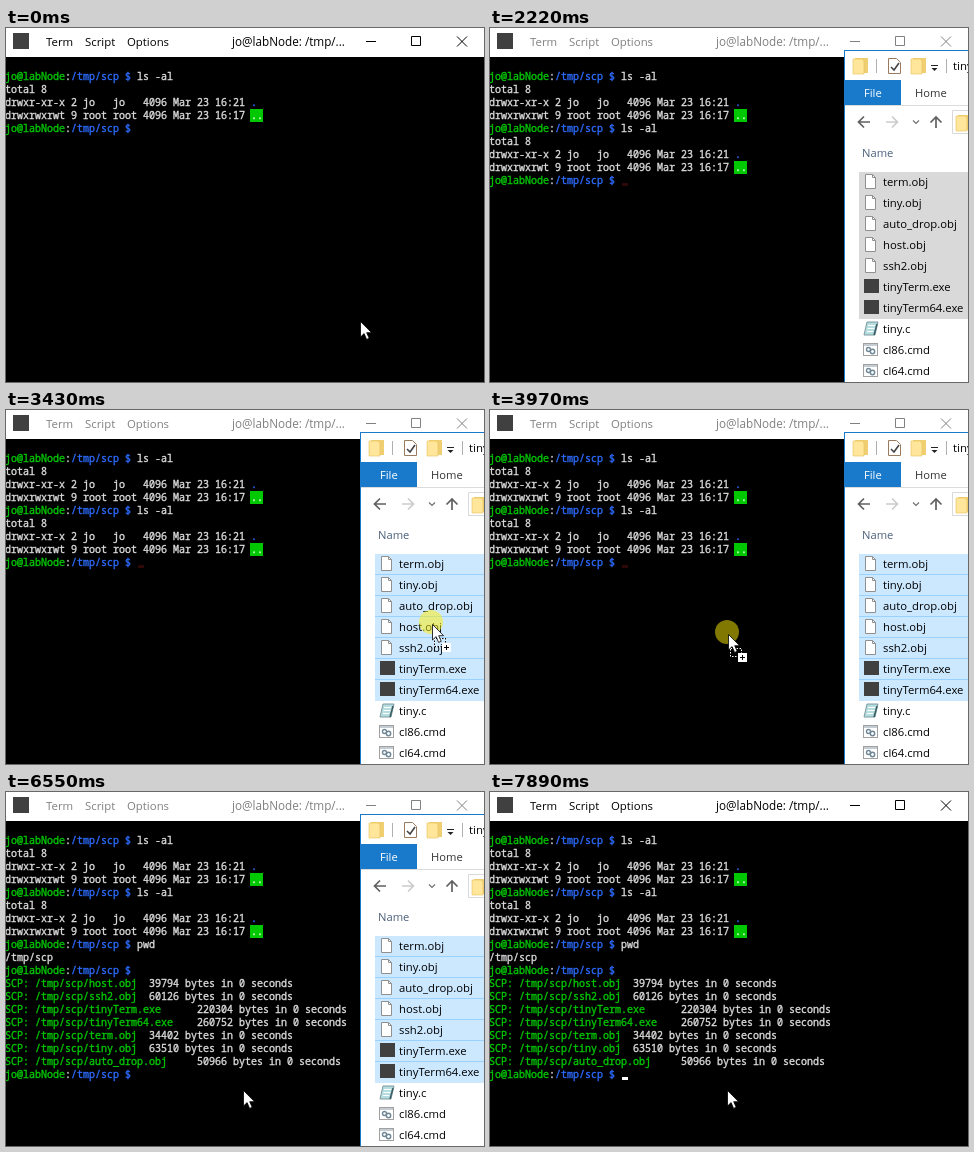
An HTML page for the animation above (8 s loop, 478x354 px).

```html
<!DOCTYPE html>
<html lang="en">
<head>
<meta charset="utf-8">
<title>Terminal file drop</title>
<style>
  html, body { margin: 0; width: 100%; height: 100%; overflow: hidden; background: #000; }
  svg { display: block; }
  text { white-space: pre; }
  .mono { font: 10px "Noto Sans Mono", "DejaVu Sans Mono", monospace; stroke-width: 0.35px; }
  .ui { font: 11.4px "Open Sans", "Noto Sans", sans-serif; }
</style>
</head>
<body>
<svg id="stage" width="478" height="354" viewBox="0 0 478 354"></svg>
<script>
const LOOP = 8000;
const GREEN = "#00c800", BLUE = "#2d6cff", GREY = "#dcdcdc";
const stage = document.getElementById("stage");
const timed = [];

function add(parent, tag, attrs, content) {
  const el = document.createElementNS("http://www.w3.org/2000/svg", tag);
  for (const key in attrs) el.setAttribute(key, attrs[key]);
  if (content !== undefined) el.textContent = content;
  parent.appendChild(el);
  return el;
}
const group = (parent, attrs = {}) => add(parent, "g", attrs);
const rect = (parent, x, y, width, height, fill, more = {}) =>
  add(parent, "rect", { x, y, width, height, fill, ...more });
const line = (parent, d, stroke, width = 1, fill = "none") =>
  add(parent, "path", { d, stroke, fill, "stroke-width": width });
const label = (parent, x, y, fill, content, size = 11.4) =>
  add(parent, "text", { x, y, fill, class: "ui", style: `font-size:${size}px` }, content);

// Visible from one time up to another
function show(el, from, to = LOOP) {
  timed.push({ el, from, to });
  return el;
}

// Terminal
const term = group(stage);
rect(term, 0, 0, 478, 354, "#000");
const rowY = row => 48 + 13 * row;
const put = (parent, row, col, fill, content) =>
  add(parent, "text", { x: col * 6 - 1, y: rowY(row) + 4, fill, stroke: fill, class: "mono" }, content);

function prompt(row, from, command = "") {
  const g = show(group(term), from);
  put(g, row, 0, GREEN, "jo@labNode");
  put(g, row, 10, GREY, ":");
  put(g, row, 11, BLUE, "/tmp/scp $");
  put(g, row, 22, GREY, command);
}
function listing(row, from) {
  const g = show(group(term), from);
  put(g, row, 0, GREY, "total 8");
  put(g, row + 1, 0, GREY, "drwxr-xr-x 2 jo   jo   4096 Mar 23 16:21");
  put(g, row + 1, 41, BLUE, ".");
  put(g, row + 2, 0, GREY, "drwxrwxrwt 9 root root 4096 Mar 23 16:17");
  rect(g, 244, rowY(row + 2) - 6, 13, 13, GREEN);
  put(g, row + 2, 41, "#e8ffe8", "..");
}
function caret(row, col, from, to, fill = "#fff") {
  show(rect(term, col * 6, rowY(row) + 3, 6, 3, fill), from, to);
}

prompt(0, 0, "ls -al");
listing(1, 0);
prompt(4, 0);
["l", "ls", "ls -", "ls -a", "ls -al"].forEach((typed, i, all) => {
  const from = 120 + 110 * i, last = i === all.length - 1;
  show(put(term, 4, 22, GREY, typed), from, last ? LOOP : from + 110);
  caret(4, 22 + typed.length, from, last ? 780 : from + 110);
});
caret(5, 0, 780, 900);
listing(5, 900);
prompt(8, 900);
caret(8, 22, 900, 1450);
caret(8, 22, 1890, 2220);
caret(8, 22, 2220, 4540, "#2c0808");

show(put(term, 8, 22, GREY, "pwd"), 4540);
show(put(term, 9, 0, GREY, "/tmp/scp"), 4540);
prompt(10, 4540);
[
  [4640, "host.obj", 24, 39794],
  [4860, "ssh2.obj", 24, 60126],
  [4980, "tinyTerm.exe", 32, 220304],
  [5200, "tinyTerm64.exe", 32, 260752],
  [5420, "term.obj", 24, 34402],
  [5540, "tiny.obj", 24, 63510],
  [5760, "auto_drop.obj", 32, 50966]
].forEach(([from, file, col, size], i) => {
  const g = show(group(term), from);
  put(g, 11 + i, 0, GREEN, "SCP: /tmp/scp/" + file);
  put(g, 11 + i, col, GREY, size + " bytes in 0 seconds");
});
prompt(18, 5760);
caret(18, 22, 6890, 7420);
caret(18, 22, 7890, LOOP);

// Title bar
rect(stage, 0, 0, 478, 29, "#fff");
rect(stage, 7, 5, 16, 16, "#404040");
function titleBar(ink, from, to) {
  const g = show(group(stage), from, to);
  label(g, 40, 18, ink, "Term");
  label(g, 79, 18, ink, "Script");
  label(g, 121, 18, ink, "Options");
  label(g, 226, 18, ink, "jo@labNode: /tmp/...", 11.7);
  line(g, "M360 13.5h10M405.5 8.5h9v9h-9z", ink);
  line(g, "M451 8.5l10 10M461 8.5l-10 10", ink);
}
titleBar("#000", 0, 2220);
titleBar("#808080", 2220, 6770);
titleBar("#000", 6770, LOOP);

// File window
const win = show(group(stage), 2220, 6890);
rect(win, 354, 22, 124, 332, "#1979ca");
rect(win, 355, 23, 123, 331, "#fff");

function folder(x, y) {
  rect(win, x + 2, y, 13, 15, "#f0cf72");
  line(win, `M${x} ${y + 1}h9l2 2v13h-11z`, "#e6bf5a", 0.6, "#ffe69b");
}
folder(363, 30);
line(win, "M386.5 31v14M456.5 31v14", "#b0b0b0");
line(win, "M398.5 30.5h8l4 4v11h-12z", "#9a7a5c", 1, "#fff");
line(win, "M401 39l3 3 5-7", "#444", 1.6);
folder(421, 30);
line(win, "M441 37.5h7", "#222");
line(win, "M441.5 40h6l-3 3z", "none", 0, "#222");
label(win, 463, 42, "#000", "tiny");

rect(win, 355, 52, 56, 25, "#1979ca");
label(win, 374, 69, "#fff", "File", 11.2);
label(win, 425, 69, "#333", "Home", 11.2);
line(win, "M355 77.5h123", "#dadbdc");

line(win, "M380 94h-11M374 88.5l-5.5 5.5 5.5 5.5", "#606060", 1.7);
line(win, "M396 94h11M402 88.5l5.5 5.5-5.5 5.5", "#cccccc", 1.7);
line(win, "M423 92.5l3 3 3-3", "#707070", 1.2);
line(win, "M446 100v-11M440.5 94.5l5.5-5.5 5.5 5.5", "#606060", 1.7);
line(win, "M478 82.5h-15.5v23h15.5", "#d9d9d9");
folder(466, 87);
label(win, 372, 129, "#4c607a", "Name", 11.2);

const rowTop = i => 144 + 21 * i;
const picked = [["#d9d9d9", 2220, 2320], ["#cce8ff", 2320, 6890]];
for (const [fill, from, to] of picked) show(rect(win, 369, 144, 109, 147, fill), from, to);

// Row outlines: under the pointer, then on every dragged row
const hover = rect(win, 369.5, 0, 120, 21, "none", { stroke: "#99d1ff" });
const dragged = show(group(win), 3310);
for (let i = 1; i < 7; i++) line(dragged, `M369 ${rowTop(i) - 0.5}h109`, "#99d1ff");

const icons = {
  obj(x, y) {
    line(win, `M${x + 1.5} ${y + .5}h7l3 3v11h-10z`, "#909090", 1, "#fff");
    line(win, `M${x + 8.5} ${y + .5}v3h3`, "#909090");
  },
  exe(x, y) { rect(win, x, y, 15, 14, "#404040"); },
  c(x, y) {
    line(win, `M${x + 3} ${y + 1}h11l-3 13h-11z`, "#7d9aa0", 1, "#b5dcde");
    line(win, `M${x + 4} ${y + 4.5}h7M${x + 3.5} ${y + 7.5}h7M${x + 3} ${y + 10.5}h6`, "#fff");
    line(win, `M${x + 13} ${y + 3}l-3 11`, "#37595f", 1.4);
  },
  cmd(x, y) {
    rect(win, x - .5, y + 1.5, 14, 12, "#fff", { stroke: "#a0a0a0" });
    line(win, `M${x} ${y + 3}h13`, "#c4ccd4", 2);
    for (const [cx, cy, r] of [[4.5, 7.5, 2], [8.5, 9.5, 2.2]])
      add(win, "circle", { cx: x + cx, cy: y + cy, r, fill: "none", stroke: "#6f8796", "stroke-width": 1.4 });
  }
};
["term.obj", "tiny.obj", "auto_drop.obj", "host.obj", "ssh2.obj", "tinyTerm.exe",
 "tinyTerm64.exe", "tiny.c", "cl86.cmd", "cl64.cmd"].forEach((name, i) => {
  icons[name.split(".")[1]](374, rowTop(i) + 2);
  label(win, 393, rowTop(i) + 14, "#000", name, 11.3);
});

// Pointer
const pointer = group(stage);
show(add(pointer, "circle", { cx: -1, cy: -2, r: 12, fill: "#fff000", "fill-opacity": 0.5 }), 3310, 4210);
const badge = show(group(pointer), 3430, 4540);
rect(badge, 2.5, 14.5, 11, 8, "none", { stroke: "#000" });
rect(badge, 2.5, 14.5, 11, 8, "none", { stroke: "#fff", "stroke-dasharray": "1.5 1.5" });
rect(badge, 10, 19, 9, 9, "#fff");
line(badge, "M12 23.5h5M14.5 21v5", "#000");
line(pointer, "M.5 .5v15.5l3.6-3.4 2.5 5.8 2.6-1.1-2.5-5.6h4.9z", "#000", 0.8, "#fff");

const path = [
  [0, 354, 293], [1560, 446, 265], [1670, 500, 240],
  [2550, 472, 118], [2660, 470, 150], [2770, 468, 180], [2870, 466, 198],
  [2980, 463, 230], [3090, 461, 258], [3200, 460, 236], [3310, 458, 218],
  [3430, 426, 214], [3650, 385, 165], [3760, 330, 132], [3870, 265, 175],
  [3970, 238, 224], [4080, 229, 226], [4210, 228, 225],
  [6310, 231, 250], [6430, 235, 280], [6550, 237, 298]
];

function draw(t) {
  for (const { el, from, to } of timed) el.style.display = t >= from && t < to ? "" : "none";
  const [, x, y] = path.findLast(step => step[0] <= t);
  pointer.setAttribute("transform", `translate(${x} ${y})`);
  const row = Math.floor((y - 144) / 21);
  hover.style.display = t >= 2550 && t < 3310 && row >= 0 ? "" : "none";
  hover.setAttribute("y", rowTop(row) - 0.5);
}

const start = performance.now();
function tick() {
  draw((performance.now() - start) % LOOP);
  requestAnimationFrame(tick);
}
tick();
</script>
</body>
</html>
```
